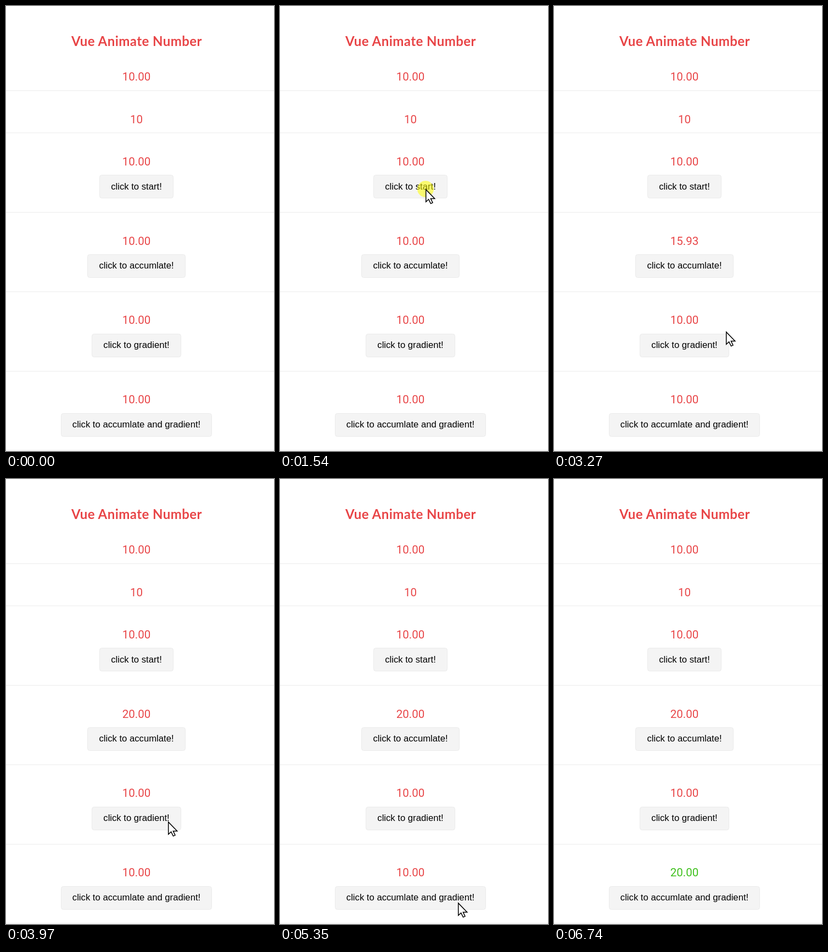
These frames come from a looping animation (488x812 px, 7270 ms). An HTML page:

```html
<!DOCTYPE html>
<html lang="en">
<head>
<meta charset="utf-8">
<title>Vue Animate Number</title>
<style>
  html, body { margin: 0; width: 100%; height: 100%; overflow: hidden; background: #fff; }
  svg { display: block; width: 488px; height: 812px; }
  text { text-anchor: middle; }
  .title { font: 700 24px Lato, sans-serif; letter-spacing: .45px; fill: #e84547; }
  .num { font: 400 20.5px Roboto, sans-serif; fill: #e84547; }
  .label { font: 16.67px "Liberation Sans", Arial, sans-serif; fill: #000; }
  .btn { fill: #f4f4f4; stroke: #ebebeb; }
  .rule { fill: #ececec; }
  #halo { fill: #ff0; fill-opacity: .54; }
  #arrow { fill: #fff; stroke: #000; stroke-width: 1.5; }
</style>
</head>
<body>
<svg viewBox="0 0 488 812">
  <text class="title" x="238" y="73">Vue Animate Number</text>
  <g id="rows"></g>
  <g id="cursor">
    <circle id="halo" r="15"/>
    <path id="arrow" d="M.7 .9V23.4L5.7 18.8L9.5 26.6L13 25L9.4 17.4H16.7Z"/>
  </g>
</svg>
<script>
const LOOP = 7270, STEP = 69.3, COUNT = 1000, PRESS = 117;
const MID = 237.5, PITCH = 144.7;
const RED = [232, 69, 71], GREEN = [62, 192, 28];

const rows = [
  { label: 'click to start!', start: 1641, from: 0, colors: [RED, RED] },
  { label: 'click to accumlate!', start: 2895, from: 10, colors: [RED, RED] },
  { label: 'click to gradient!', start: 4279, from: 0, colors: [GREEN, RED] },
  { label: 'click to accumlate and gradient!', start: 5687.5, from: 10, colors: [RED, GREEN] }
];

// cursor stops: arrival time, x, y and, on a button, the row it clicks before leaving
const stops = [
  [69, 406, 788], [560, 235, 182], [1210, 265, 334, 0],
  [2217, 380, 431], [2640, 286, 493, 1],
  [3257, 313, 594], [3740, 295, 625, 2],
  [4570, 338, 695], [4782, 329, 748], [5300, 324, 773, 3],
  [6098, 486, 789], [6400, 490, 812]
];

const $ = id => document.getElementById(id);
const mix = (a, b, p) => Math.round(a + (b - a) * p);
const easeOut = p => 1 - (1 - p) ** 2;

function add(tag, attrs, text) {
  const el = document.createElementNS('http://www.w3.org/2000/svg', tag);
  for (const key in attrs) el.setAttribute(key, attrs[key]);
  if (text) el.textContent = text;
  return $('rows').appendChild(el);
}

function addCounter(base, rule, text) {
  add('rect', { class: 'rule', x: 0, y: rule, width: 488, height: 1 });
  return add('text', { class: 'num', x: MID, y: base }, text);
}

function addButton(top, base, text) {
  const label = add('text', { class: 'label', x: MID, y: base }, text);
  const half = Math.round((label.getComputedTextLength() + 41) / 2);
  const box = add('rect', { class: 'btn', x: MID - half, y: top + .5,
                            width: half * 2, height: 42, rx: 4 });
  label.before(box);
}

addCounter(136, 154, '10.00');
addCounter(214, 231, '10');
rows.forEach((row, i) => {
  const at = y => Math.round(y + i * PITCH);
  row.num = addCounter(at(291), at(376.3), '10.00');
  addButton(at(308.4), at(334.6), row.label);
});

function drawRow({ num, start, from, colors: [a, b] }, t) {
  const idle = t < start;
  const p = easeOut(Math.min(1, (t - start) / COUNT));
  num.textContent = (idle ? 10 : from + 10 * p).toFixed(2);
  num.style.fill = `rgb(${idle ? RED : a.map((c, i) => mix(c, b[i], p))})`;
}

function drawCursor(t) {
  const i = stops.findIndex(stop => stop[0] > t);
  $('cursor').style.display = i > 0 ? '' : 'none';
  if (i < 1) return;
  const [arrive, x0, y0, click] = stops[i - 1], [end, x1, y1] = stops[i];
  const leave = click === undefined ? arrive : rows[click].start;
  const p = easeOut(Math.max(0, (t - leave) / (end - leave)));
  $('cursor').setAttribute('transform', `translate(${mix(x0, x1, p)} ${mix(y0, y1, p)})`);
  const down = click !== undefined && t >= leave - PRESS && t < leave;
  $('halo').style.display = down ? '' : 'none';
}

const began = performance.now();

function draw() {
  const time = (performance.now() - began) % LOOP;
  const t = Math.floor((time + 4) / STEP) * STEP;   // the picture ticks in even steps
  for (const row of rows) drawRow(row, t);
  drawCursor(t);
  requestAnimationFrame(draw);
}
draw();
</script>
</body>
</html>
```
